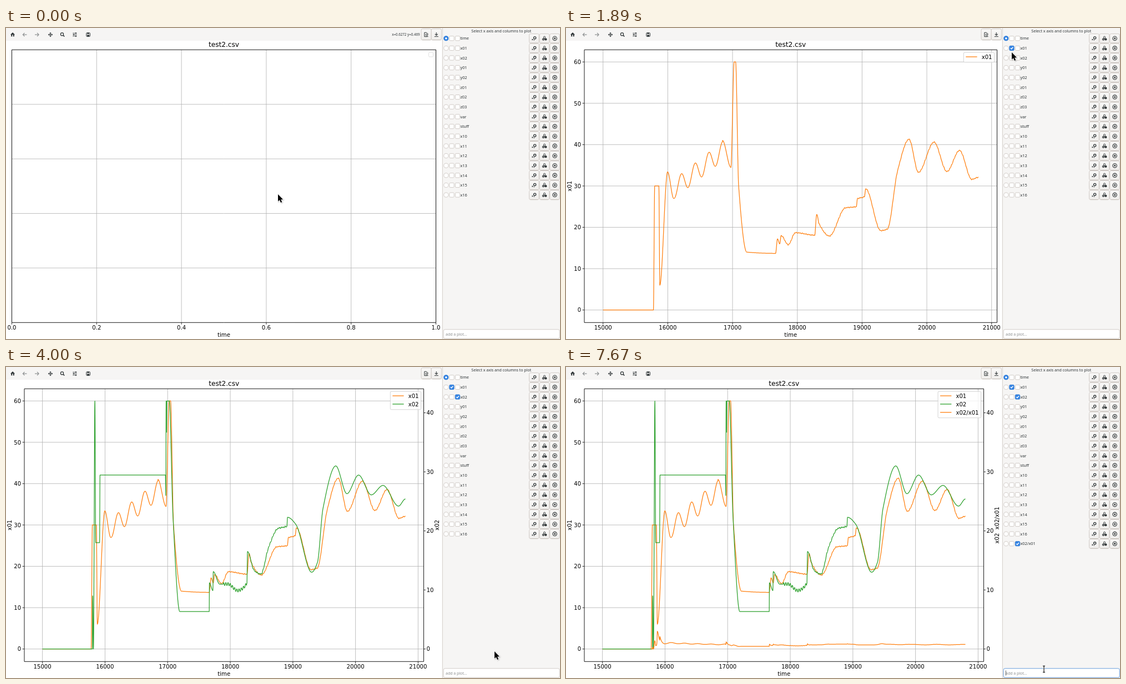
Write an HTML page with a canvas that moves like this. It is 998 by 561 pixels and loops after 8000 ms.

```html
<!DOCTYPE html>
<html lang="en">
<head>
<meta charset="utf-8">
<title>test2.csv</title>
<style>
html, body { margin: 0; width: 100%; height: 100%; overflow: hidden; background: #f6f5f4; }
canvas { display: block; }
</style>
</head>
<body>
<canvas id="stage" width="998" height="561"></canvas>
<script>
const ctx = document.getElementById('stage').getContext('2d');
const FPS = 9, LOOP = 8000, SPAN = 5797;
const INK = '#2e3436', BLUE = '#3584e4', BORDER = '#cdc7c2', PANEL = '#f6f5f4';
const ORANGE = '#ff7f0e', GREEN = '#2ca02c';
const UI = '"Noto Sans", "Open Sans", sans-serif', PLOT = '"DejaVu Sans", sans-serif';
const COLUMNS = 'time x01 x02 y01 y02 z01 z02 z03 var stuff x10 x11 x12 x13 x14 x15 x16'.split(' ');
const TYPED = 'x02/x01';
// Steps of the clock at which something happens
const PLOT1 = 17, PLOT2 = 23, IBEAM = 37, FOCUS = 39, TYPING = 47, ENTER = 65;

// Turning points: seconds after 15000, value
const X01 = [0,0, 778,0, 798,30, 862,30, 877,6, 997,33.4, 1091,27, 1845,41, 1974,34.5,
  2025,60, 2047,60, 2094,30, 2220,14, 2664,13.7, 2694,17.2, 2728,16, 2750,18, 2860,15.8,
  2970,18.7, 3268,18.1, 3300,23.2, 3335,20.9, 3495,17.9, 3740,24.7, 3911,25, 3928,26.9,
  4035,27.4, 4057,29.3, 4288,19.2, 4391,19.6, 4550,33.8, 4725,41.3, 4870,33.3, 5111,40.6,
  5310,33.5, 5505,38.6, 5694,31.6, 5797,32.1];
const X02 = [0,0, 798,0, 802,9, 815,0, 838,42, 851,18, 913,18, 920,29.45, 1964,29.45, 1971,26,
  1976,42, 1983,36.7, 1987,42, 2026,42, 2085,22.5, 2194,6.35, 2664,6.35, 2667,11.2, 2722,9.9,
  2729,13.1, 2830,11, 2965,11, 3116,9.9, 3266,11.1, 3275,16.5, 3382,13.3, 3490,12.7,
  3612,17.2, 3760,20.4, 3905,20.8, 3914,22.3, 4047,21.1, 4300,13, 4393,14.7, 4481,23.8,
  4685,31, 4863,26.3, 5049,29.45, 5252,26.1, 5439,27.7, 5687,24.2, 5797,25.4];

// Monotone cubic through the points, one value per second
function sample(points) {
  const n = points.length / 2, x = i => points[2 * i], y = i => points[2 * i + 1];
  const slope = i => (y(i + 1) - y(i)) / (x(i + 1) - x(i));
  const tangent = i => {
    if (i === 0 || i === n - 1) return 0;
    const a = slope(i - 1), b = slope(i);
    return a * b > 0 ? 2 * a * b / (a + b) : 0;
  };
  const out = [];
  for (let i = 0; i < n - 1; i++) {
    const h = x(i + 1) - x(i), m0 = tangent(i) * h, m1 = tangent(i + 1) * h;
    for (let t = x(i); t <= x(i + 1); t++) {
      const u = (t - x(i)) / h, v = 1 - u;
      out[t] = y(i) * (1 + 2 * u) * v * v + m0 * u * v * v
             + y(i + 1) * u * u * (3 - 2 * u) - m1 * u * u * v;
    }
  }
  return out;
}
const ripple = t => Math.sin(t / 4.7) + 0.6 * Math.sin(t / 7.9 + 1);
const climb = t => 29.2 + 0.0122 * (t - 1091) + 2.3 * Math.cos((t - 1845) * Math.PI / 106);
const x01 = sample(X01).map((v, t) =>
  t > 1091 && t < 1845 ? climb(t) : t > 2760 ? v + 0.07 * ripple(t) : v);
const x02 = sample(X02).map((v, t) =>
  t > 2890 && t < 3262 ? v + 0.25 * Math.sin(t / 5.6)
  : t > 3320 && t < 3905 ? v + 0.08 * ripple(t) : v);
const ratio = x01.map((v, t) => t > 778 ? x02[t] / v : NaN);

function text(str, x, y, size, { font = UI, color = INK, align = 'left' } = {}) {
  ctx.font = `${size}px ${font}`;
  ctx.fillStyle = color;
  ctx.textAlign = align;
  ctx.fillText(str, x, y);
}
const label = (str, x, y, align = 'center', size = 10.1) =>
  text(str, x, y, size, { font: PLOT, color: '#000', align });
function vertical(str, x, y) {
  ctx.save();
  ctx.translate(x, y);
  ctx.rotate(-Math.PI / 2);
  label(str, 0, 0);
  ctx.restore();
}
function trace(pts) {
  ctx.beginPath();
  for (let i = 0; i < pts.length; i += 2) ctx.lineTo(pts[i], pts[i + 1]);
}
function paint(fill, stroke, width) {
  if (fill) { ctx.fillStyle = fill; ctx.fill(); }
  if (stroke) { ctx.strokeStyle = stroke; ctx.lineWidth = width; ctx.stroke(); }
}
function line(color, width, ...pts) {
  trace(pts);
  paint(null, color, width);
}
function shape(color, ...pts) {
  trace(pts);
  paint(color);
}
function box(x, y, w, h, r, fill, stroke, width = 0.9) {
  ctx.beginPath();
  ctx.roundRect(x, y, w, h, r);
  paint(fill, stroke, width);
}
function circle(x, y, r, fill, stroke, width = 0.9) {
  ctx.beginPath();
  ctx.arc(x, y, r, 0, 7);
  paint(fill, stroke, width);
}

function button(x, y, w, h) {
  const g = ctx.createLinearGradient(0, y, 0, y + h);
  g.addColorStop(0, '#f9f8f7');
  g.addColorStop(1, '#f0eeec');
  box(x, y, w, h, 2.5, g, BORDER);
  line('#bfb8b1', 0.8, x + 2, y + h, x + w - 2, y + h);
}

function toolbar() {
  ctx.fillStyle = PANEL;
  ctx.fillRect(0, 0, 785, 23);
  // home
  shape(INK, 12, 8, 16, 12, 8, 12);
  ctx.fillRect(9.2, 12, 2, 3.3);
  ctx.fillRect(12.8, 12, 2, 3.3);
  // back and forward
  for (const [x, d] of [[34, -1], [55.5, 1]]) {
    line('#8b8e8f', 1.2, x - 3.5, 12, x + 3.5, 12);
    line('#8b8e8f', 1.2, x + d * 0.6, 8.8, x + d * 3.6, 12, x + d * 0.6, 15.2);
  }
  // move
  for (let k = 0; k < 4; k++) {
    ctx.save();
    ctx.translate(80, 12);
    ctx.rotate(k * Math.PI / 2);
    line(INK, 1.1, 0, 0, 3, 0);
    shape(INK, 4.3, 0, 2.2, 1.8, 2.2, -1.8);
    ctx.restore();
  }
  // zoom
  circle(101, 11.2, 2.6, null, INK, 1.2);
  line(INK, 1.5, 103, 13.2, 105.3, 15.4);
  // sliders
  for (let k = 0; k < 3; k++) {
    const y = 9.3 + 2.7 * k, knob = k === 1 ? 122 : 125.8;
    line(INK, 0.8, 120.2, y, 127.6, y);
    line(INK, 1.4, knob, y - 1.2, knob, y + 1.2);
  }
  // save
  box(144.8, 8.7, 6.6, 6.6, 0.8, null, INK, 1);
  ctx.fillStyle = INK;
  ctx.fillRect(146.3, 8.7, 3.4, 2.2);
  ctx.fillRect(146.1, 12.3, 4, 2.8);

  button(748, 1.5, 18.2, 20);
  button(766.2, 1.5, 18.2, 20);
  line(INK, 1, 759.6, 15.6, 753.8, 15.6, 753.8, 8.2, 757.5, 8.2, 760, 10.7, 760, 12);
  circle(757.6, 12.4, 1.6, null, INK, 1);
  line(INK, 1, 758.8, 13.6, 760.5, 15.3);
  line(INK, 1.1, 775.3, 8, 775.3, 13);
  line(INK, 1.1, 772.8, 10.8, 775.3, 13.3, 777.8, 10.8);
  line(INK, 1, 771.8, 15.4, 778.8, 15.4);
}

function check(x, y, on, pressed) {
  box(x - 4.1, y - 4.1, 8.2, 8.2, 1.5, on ? BLUE : pressed ? '#d0cbc6' : '#fff', on ? '#2a76d2' : BORDER);
  if (on) line('#fff', 1.4, x - 2.2, y, x - 0.6, y + 1.7, x + 2.4, y - 1.8);
}

function row(i, name, frame) {
  const y = 18.7 + 17.65 * i;
  circle(792.8, y, 4.1, i ? '#fff' : BLUE, i ? BORDER : '#2a76d2');
  if (!i) circle(792.8, y, 1.7, '#fff');
  check(803, y, i === 1 && frame >= PLOT1, i === 1 && frame >= PLOT1 - 2);
  check(813.5, y, (i === 2 && frame >= PLOT2) || i === 17, i === 2 && frame >= PLOT2 - 1);
  text(name, 818.4, y + 2.7, 7.35);
  for (let k = 0; k < 3; k++) button(942.5 + 18.6 * k, y - 8.3, 17.6, 16.8);
  circle(952.6, y - 0.9, 2.1, null, INK, 1.3);
  circle(948.4, y + 2.2, 1.1, INK);
  circle(951.4, y + 3, 0.8, INK);
  circle(970, y - 2, 1.7, null, INK, 0.9);
  circle(968, y + 1.7, 1.8, '#77797a', INK, 0.8);
  circle(972.3, y + 1.7, 2.1, INK);
  circle(988.6, y, 3.7, null, INK, 1.1);
  for (const d of [-1.5, 1.5]) line(INK, 1.2, 988.6 - d, y - 1.5, 988.6 + d, y + 1.5);
}

function entry(frame) {
  const focus = frame >= FOCUS;
  const count = Math.max(0, Math.floor((frame - 44.15) / 2.4));
  const typed = frame >= ENTER ? '' : TYPED.slice(0, count);
  box(788.2, 543.8, 209, 16.4, 2.5, '#fff', focus ? '#5b95d8' : BORDER);
  if (typed) text(typed, 792, 554.6, 7.35);
  else text('add a plot...', 792, 554.6, 6.95, { color: '#8b8e8f' });
  if (focus) {
    ctx.font = `7.35px ${UI}`;
    const x = 792.4 + ctx.measureText(typed).width;
    line(INK, 0.8, x, 547.5, x, 556.5);
  }
}

function legend(right, items) {
  if (!items.length) return box(right - 8, 44, 8, 8, 1.5, '#fff', '#ddd');
  ctx.font = `10.1px ${PLOT}`;
  const w = 36.4 + Math.max(...items.map(([name]) => ctx.measureText(name).width));
  const x = right - w;
  box(x, 44, w, 3 + 14.9 * items.length, 2, 'rgba(255,255,255,.8)', '#d3d3d3', 1);
  items.forEach(([name, color], i) => {
    const y = 52 + 14.9 * i;
    line(color, 1.3, x + 4, y, x + 24.3, y);
    label(name, x + 32.4, y + 3.7, 'left');
  });
}

const leftY = v => 508.7 - 7.458 * v, rightY = v => 508.7 - 10.653 * v;
function series(data, color, x0, step, toY) {
  ctx.beginPath();
  for (let t = 0; t <= SPAN; t++)
    if (!isNaN(data[t])) ctx.lineTo(x0 + t * step / 1000, toY(data[t]));
  ctx.lineJoin = 'round';
  paint(null, color, 1.25);
  ctx.lineJoin = 'miter';
}

function plot(frame) {
  ctx.fillStyle = '#fff';
  ctx.fillRect(0, 23, 785, 538);
  const empty = frame < PLOT1, twin = frame >= PLOT2, third = frame >= ENTER;
  const left = empty ? 10.5 : 33, right = empty ? 774.5 : twin ? 752.5 : 776.5;
  const top = 39.3, bottom = 531.3, mid = (left + right) / 2;
  const x0 = empty ? left : twin ? 65.6 : 66.7;
  const step = empty ? 152.8 : twin ? 112.8 : 116.67;
  const hline = y => line('#b0b0b0', 0.8, left, y, right, y);

  for (let i = 0; i < (empty ? 6 : 7); i++) {
    const x = x0 + i * step;
    line('#b0b0b0', 0.8, x, top, x, bottom);
    line('#000', 0.8, x, bottom, x, bottom + 3.5);
    label(empty ? (i / 5).toFixed(1) : 15000 + 1000 * i, x, 543.9);
  }
  if (empty) {
    for (let i = 1; i < 5; i++) hline(top + 98.4 * i);
  } else {
    for (let v = 0; v <= 60; v += 10) {
      const y = leftY(v);
      hline(y);
      line('#000', 0.8, left - 3.5, y, left, y);
      label(v, 27.2, y + 3.7, 'right');
    }
    series(x01, ORANGE, x0, step, leftY);
    vertical('x01', 9.8, 285.3);
  }
  if (twin) {
    for (let v = 0; v <= 40; v += 10) {
      const y = rightY(v);
      line('#000', 0.8, right, y, right + 3.5, y);
      label(v, 757.6, y + 3.7, 'left');
    }
    series(x02, GREEN, x0, step, rightY);
    if (third) series(ratio, ORANGE, x0, step, rightY);
    vertical(third ? 'x02  x02/x01' : 'x02', 779.8, 285.3);
  }
  box(left, top, right - left, bottom - top, 0, null, '#000', 0.9);
  label('test2.csv', mid, 34.3, 'center', 12.1);
  label('time', mid, 556.6);
  const items = [['x01', ORANGE], ['x02', GREEN], [TYPED, ORANGE]];
  legend(right - 5, items.slice(0, empty ? 0 : third ? 3 : twin ? 2 : 1));
}

// Moves of the pointer: first step, last step, target x, y
const MOVES = [[6, 14, 801, 35], [16, 17, 803, 44], [17, 20, 813, 53], [30, 36, 880, 513],
  [36, 38, 884, 546], [66, 69, 861, 545]];
function pointerAt(frame) {
  let x = 490, y = 300;
  for (const [from, to, tx, ty] of MOVES) {
    const u = Math.min(1, Math.max(0, (frame - from) / (to - from))), e = u * u * (3 - 2 * u);
    x += (tx - x) * e;
    y += (ty - y) * e;
  }
  return [x, y];
}

function pointer(frame, x, y) {
  if (frame >= TYPING && frame < 67) return;
  if (frame >= IBEAM) {
    for (const [color, w] of [['#fff', 2.4], ['#000', 1.1]]) {
      line(color, w, x, y - 5.5, x, y + 5.5);
      for (const d of [-5.7, 5.7]) line(color, w, x - 2, y + d, x + 2, y + d);
    }
    return;
  }
  ctx.save();
  ctx.translate(x, y);
  ctx.shadowColor = 'rgba(0,0,0,.25)';
  ctx.shadowBlur = 2;
  ctx.shadowOffsetX = ctx.shadowOffsetY = 1;
  trace([0, 0, 0, 12.8, 2.9, 10.2, 5, 15, 7.2, 14, 5.1, 9.4, 9, 9.2]);
  ctx.closePath();
  paint(null, '#fff', 1.4);
  ctx.shadowColor = 'transparent';
  paint('#000');
  ctx.restore();
}

function draw(now) {
  const frame = Math.floor((now % LOOP) * FPS / 1000 + 0.05);
  const [x, y] = pointerAt(frame);
  ctx.fillStyle = PANEL;
  ctx.fillRect(0, 0, 998, 561);
  plot(frame);
  toolbar();
  if (x < 774.5 && frame < PLOT1) {
    const px = +((x - 10.5) / 764.5).toPrecision(4), py = +((531 - y) / 492.5).toPrecision(4);
    text(`x=${px} y=${py}`, 745.5, 14.2, 6.2, { align: 'right' });
  }
  line('#d9d5d1', 1, 786.5, 0, 786.5, 561);
  text('Select x axis and columns to plot', 892.3, 7.8, 7.07, { align: 'center' });
  COLUMNS.forEach((name, i) => row(i, name, frame));
  if (frame >= ENTER) row(17, TYPED, frame);
  entry(frame);
  pointer(frame, x, y);
}

const start = performance.now();
function tick() {
  draw(performance.now() - start);
  requestAnimationFrame(tick);
}
tick();
</script>
</body>
</html>
```
